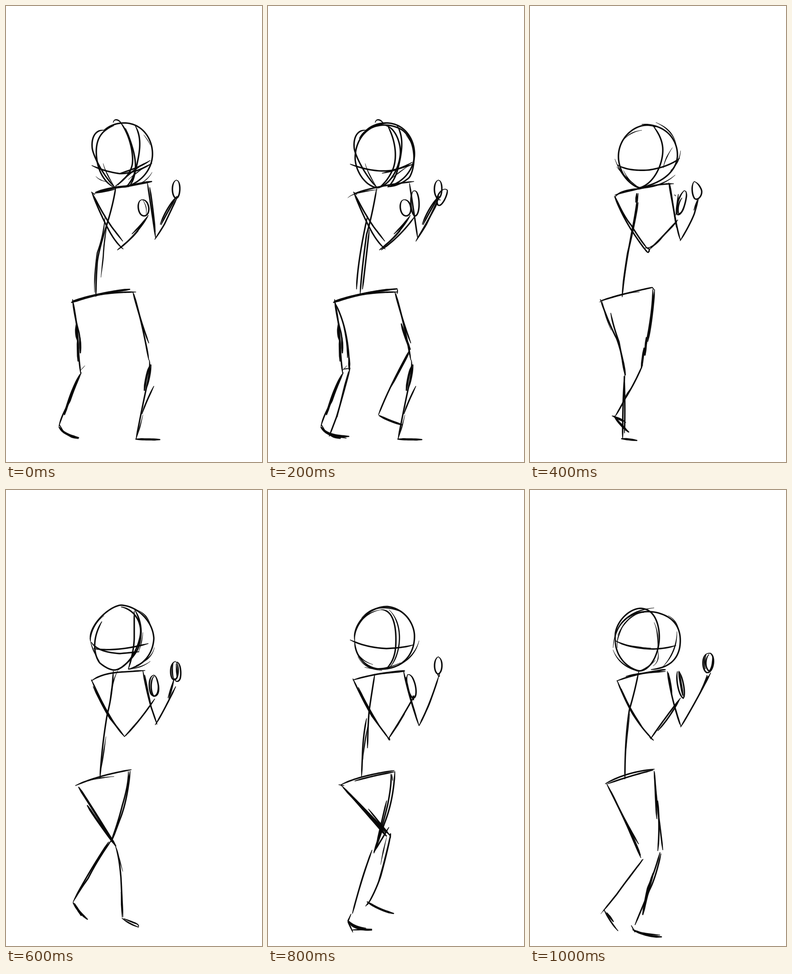
Recreate the animation shown at these times as an HTML page. Size 561x998 px, loop 1200 ms.

```html
<!DOCTYPE html>
<html lang="en">
<head>
<meta charset="utf-8">
<title>Sketched walk cycle</title>
<style>
  html, body { margin: 0; width: 100%; height: 100%; overflow: hidden; background: #fff; }
  /* six poses side by side, shown one at a time */
  svg { display: block; width: 3366px; height: 998px; animation: walk 1.2s steps(6, end) infinite; }
  path { fill: none; stroke: #080808; stroke-width: 2.6; stroke-linecap: round; stroke-linejoin: round; }
  path.inked { fill: #080808; stroke-width: .3; }
  @keyframes walk { to { transform: translateX(-100%); } }
</style>
</head>
<body>
<svg viewBox="0 0 3366 998">
  <defs>
    <!-- lines common to the first two poses -->
    <g id="stance">
      <path d="M235 255Q236 248 243 249Q250 251 253 258M214 272Q236 255 262 256C300 258 322 292 321 326C320 355 300 385 262 396M215 272C198 270 186 285 189 312C192 330 215 375 240 398"/>
      <path d="M187 407L195 413M190 411Q210 452 232 484L256 515M188 408Q205 452 225 490Q240 518 257 532M244 534Q280 508 310 462M276 499Q298 478 312 458M246 532Q268 516 290 492"/>
      <path d="M297 424C288 426 287 447 296 457C306 464 314 455 313 442C311 428 304 423 297 424M373 381C362 385 362 415 372 421C382 422 384 388 376 382L373 381"/>
      <path d="M326 511Q340 490 347 478L376 417M338 478Q352 440 375 416M340 479Q346 465 372 420M310 388Q318 440 328 508"/>
      <path d="M145 646Q205 626 285 626M160 641Q200 630 240 625M146 642Q150 680 160 715Q164 740 163 760M146 644Q157 700 158 740Q160 780 164 806"/>
      <path class="b" d="M143 649Q200 628 272 620M154 697Q152 720 158 735M157 728L158 778M162 725L163 760M150 833Q138 860 128 895"/>
      <path class="t" d="M163 798L173 787M300 895Q292 930 284 949"/>
      <path d="M165 802Q150 835 140 865Q122 895 116 920M162 806Q140 845 128 895M117 916L126 933L145 944L159 947"/>
      <path d="M278 626Q295 690 313 738M280 630Q300 700 312 770M306 735L313 775M318 785Q315 820 305 842M314 775Q317 790 310 825Q300 870 285 948M324 832Q305 870 298 893"/>
      <path class="b" d="M116 921Q125 938 160 945M317 785Q308 800 303 842M284 948L338 949"/>
    </g>
  </defs>

  <g>
    <use href="#stance"/>
    <path d="M236 262C200 275 195 305 199 335C202 360 215 385 235 396M250 254C268 275 280 318 277 345C274 365 260 380 240 394M283 262C300 290 292 325 285 355Q277 385 262 396M262 268C275 300 290 340 281 372Q277 388 268 396"/>
    <path d="M188 349Q215 362 250 367Q285 366 320 344M250 366Q290 355 316 338M302 345Q270 365 245 392"/>
    <path class="t" d="M213 345Q218 365 238 396M197 373Q205 382 222 385M302 282Q312 295 316 304M320 364Q310 382 292 389M308 350Q285 365 268 380M300 425Q310 440 307 455"/>
    <path class="b" d="M196 408Q230 397 262 395Q295 388 320 384"/>
    <path d="M194 410L240 401M315 397Q322 440 327 494M241 393Q236 430 222 475Q203 535 200 560Q197 600 197 636"/>
    <path class="t" d="M217 458Q215 500 200 540Q193 590 194 627M222 478Q215 510 213 550L208 594"/>
  </g>

  <g transform="translate(561)">
    <use href="#stance"/>
    <path d="M258 257C210 262 190 300 191 335C193 365 215 395 240 398C275 390 292 340 290 315C288 290 275 265 258 262M200 290C215 262 260 250 295 272C325 295 325 350 310 375Q290 393 262 396M262 262C278 290 287 335 270 365Q258 388 242 398M283 262C300 290 292 325 285 355Q277 385 262 396"/>
    <path d="M180 346Q230 365 270 360Q300 353 318 346M250 366Q290 358 316 342M190 410Q240 393 320 384M248 534Q290 505 322 460"/>
    <path class="t" d="M175 420Q185 408 240 402M213 345Q218 365 238 396M302 282Q312 295 316 304M308 350Q285 365 268 380"/>
    <path d="M318 405C310 415 312 455 322 460C333 458 334 420 325 406Q322 403 318 405M386 401C372 405 365 430 374 437C383 437 394 412 393 403Q390 400 386 401M368 420L378 425M324 515Q345 480 372 430"/>
    <path d="M238 400Q228 460 216 500Q205 580 202 630M218 460Q196 560 194 620M222 490Q213 570 207 620M145 647Q210 625 284 619L283 630"/>
    <path d="M147 650Q178 710 178 795M164 690Q176 740 174 770M180 792Q165 850 150 900L134 942M165 795L178 793M134 938L172 946"/>
    <path class="t" d="M176 800Q160 860 152 900M246 897L270 909"/>
    <path class="b" d="M116 922Q130 942 178 942M292 695Q300 725 312 752M243 896Q265 908 295 917M178 770L178 797"/>
    <path d="M311 752Q265 835 242 895M309 760L270 833"/>
  </g>

  <g transform="translate(1122)">
    <path d="M275 265C240 248 190 285 194 335C197 365 215 390 240 398C270 390 290 350 291 318C292 295 280 275 270 263M245 259C300 258 325 295 323 330C320 360 295 385 245 397M192 348Q215 362 260 359Q305 352 328 333"/>
    <path class="t" d="M276 255Q312 270 320 302M283 266Q308 275 320 305M205 293Q220 275 245 272M330 317Q327 345 308 360M326 335Q305 375 285 382M186 335Q205 385 240 400M190 352Q212 380 240 398M205 360Q215 382 232 393M312 310Q295 335 292 355M318 370Q290 395 240 400"/>
    <path d="M186 419Q195 403 240 400Q280 389 315 389M186 414Q200 408 240 400M185 416Q200 455 222 490Q245 525 258 540M187 418Q205 460 222 480Q240 510 258 532M246 525L258 540Q265 535 258 528L252 530"/>
    <path d="M258 530Q275 525 290 505L324 468M262 533Q290 505 322 472M338 404C328 412 318 440 322 456C330 462 340 440 343 415Q343 403 338 404M325 412L320 458M333 420Q322 435 325 455Q335 455 340 430M317 413L319 416"/>
    <path d="M304 387Q312 430 319 468Q325 500 330 513M306 388Q314 440 321 485M329 514Q350 480 360 455L369 423M359 447L367 424M360 384C353 390 354 415 362 423C372 424 378 412 376 403Q370 388 360 384"/>
    <path d="M237 410Q232 450 224 490Q205 590 202 637M237 430Q227 490 214 540Q206 590 203 620M155 645Q210 628 268 616L273 622"/>
    <path class="t" d="M152 648Q200 627 240 626M224 833Q210 850 205 863M158 645Q165 680 178 710"/>
    <path d="M154 642Q175 700 190 728Q205 770 208 808M177 672Q182 700 195 735L208 805M208 808Q203 850 203 948M206 810Q209 870 207 935"/>
    <path d="M269 620Q270 650 260 710L250 765M273 621Q268 690 258 735M247 785Q230 825 208 860Q195 885 186 899M180 897Q205 905 210 912M180 897L205 910"/>
    <path class="b" d="M234 410L232 430M202 770L209 808M200 947Q215 948 235 951M255 725L252 765M250 748L244 793M184 897Q200 920 217 933M188 904L215 932"/>
  </g>

  <g transform="translate(1683)">
    <path d="M185 330C180 300 220 258 250 252C285 252 322 285 324 325C322 360 300 385 268 392M210 288C188 325 192 360 205 378Q225 395 240 394C275 385 297 330 295 305C292 275 270 258 252 256M281 265L281 325Q280 355 268 392M282 262Q305 300 290 345Q280 370 245 394"/>
    <path d="M187 333Q200 355 250 358L292 354M192 347Q240 355 312 336"/>
    <path class="t" d="M184 325Q188 350 205 375M285 262Q310 270 318 300M325 345Q320 370 285 384M316 375Q300 388 268 393M300 312Q298 335 290 355M185 330Q187 295 215 275"/>
    <path d="M187 418Q210 400 260 398L305 395M187 415Q210 465 222 485Q240 518 260 540M191 430Q215 480 228 500L258 537M259 540Q290 510 326 457M262 538L295 500"/>
    <path d="M324 405C312 407 312 435 318 447C326 456 337 450 334 428Q330 406 324 405M325 407C317 412 315 440 324 452Q336 448 333 425"/>
    <path d="M300 396Q308 440 318 475L331 513M304 405Q312 450 318 472M327 514Q340 495 372 430M355 455L368 415M357 457Q365 430 368 412"/>
    <path d="M372 375C360 376 357 405 366 415C378 420 380 390 374 377M372 377C381 372 386 400 381 415Q372 425 370 412M366 380Q362 400 368 415M373 380L375 412"/>
    <path d="M235 396Q233 450 222 490Q210 560 206 630M152 647Q200 625 275 612M240 780Q248 800 252 850L256 935"/>
    <path class="t" d="M245 395Q232 420 228 460M219 540Q212 590 206 622M180 637Q200 630 237 627M242 785L256 835M252 880L254 935"/>
    <path class="b" d="M159 650Q185 690 205 722L241 780M178 690Q200 725 240 778M150 905L165 932M147 903Q160 925 179 940"/>
    <path d="M268 616Q270 640 255 690Q245 730 230 770M272 615Q266 680 250 720L232 768M232 765Q200 810 180 850Q155 885 147 902M225 770Q185 830 150 895M254 937Q270 950 291 957M258 938L288 950Q293 955 289 957"/>
  </g>

  <g transform="translate(2244)">
    <path d="M190 330C185 290 225 255 260 255C295 257 322 290 321 322C320 365 290 393 245 392C215 390 190 365 190 330M248 262C275 262 282 300 280 340Q278 375 258 392M180 328Q215 345 260 347Q300 345 318 339"/>
    <path class="t" d="M205 280Q235 245 290 265Q315 280 321 315M265 262C285 280 293 315 285 350Q278 380 262 392M192 345Q197 372 230 382M331 330Q322 365 285 385M197 365Q212 392 250 395M212 388Q250 398 290 378M190 320Q200 270 248 262"/>
    <path d="M186 416Q230 402 300 395M230 404Q270 399 300 397M186 413Q210 465 228 495L266 546M198 432Q215 470 248 523M262 542L267 549L266 541M264 544Q290 505 321 450"/>
    <path d="M306 404C300 415 307 448 318 456C328 455 326 425 315 408Q309 402 306 404M297 396Q308 450 331 516M302 410Q312 460 325 495M331 516Q355 470 374 408M371 402L375 410L376 402M373 365C363 369 362 397 372 403C383 402 385 370 373 365"/>
    <path class="t" d="M268 540L300 490M335 505Q355 470 362 445M220 510Q210 560 208 590M260 760Q250 800 247 820M224 800Q210 835 195 890"/>
    <path d="M234 403Q228 440 222 480Q219 510 218 565M216 500Q208 540 207 580L205 627M160 645Q200 625 277 614M190 637Q230 625 277 617M155 645L167 647"/>
    <path d="M160 646Q210 695 268 757M165 652Q200 690 258 750M220 698L268 757M269 622Q272 640 262 690Q250 740 232 792M278 616Q275 680 255 730Q245 760 232 795M271 622L273 636M260 680Q248 730 238 775M232 793L265 738"/>
    <path class="b" d="M185 672L260 758M318 450L319 460M268 752L268 762M217 901Q245 920 276 927M177 944Q185 962 228 963"/>
    <path d="M269 752Q262 790 247 845Q235 880 218 908M268 760Q250 835 240 865M214 911L222 900M228 788Q205 850 185 927M182 928L175 944L186 968M183 963L228 961M178 944Q190 957 215 959"/>
  </g>

  <g transform="translate(2805)">
    <path d="M188 330C180 300 210 262 240 259C280 258 285 310 283 330C280 365 262 395 240 396C210 390 185 360 187 325M195 300C215 265 260 260 290 272C325 285 333 315 328 345C322 375 300 390 265 393M187 330Q220 347 270 348Q300 347 320 340"/>
    <path class="t" d="M205 285Q230 262 272 258M192 318Q215 270 250 268M182 345Q187 290 225 272M192 345Q187 325 208 290M200 337Q235 345 265 346M272 290Q282 310 280 350M182 350Q195 385 240 398M322 310Q322 355 290 388M275 372Q265 385 240 396M303 275Q322 285 327 310M280 350Q285 375 270 385"/>
    <path d="M190 418Q230 402 297 393M210 408Q240 400 297 397M191 417Q208 460 225 490Q245 522 270 547M200 435Q215 475 248 522M262 541L271 548M264 545Q295 500 330 455M280 527Q305 500 328 458"/>
    <path d="M323 397C319 415 326 450 336 456C342 445 335 410 326 396M301 397Q310 460 331 518M303 400Q310 430 311 450M316 470L328 512M330 519Q360 470 396 400M370 450L390 407M372 445Q383 425 388 405"/>
    <path d="M388 358C376 362 376 395 388 400C402 400 408 365 395 357L388 358M392 360C383 370 383 390 393 397Q402 385 400 362M386 360Q380 375 384 392"/>
    <path d="M238 398Q230 440 218 480Q208 540 208 633M165 643Q210 617 273 611M170 643Q220 625 270 613M168 643Q195 695 215 740L243 805M178 660Q200 710 238 775"/>
    <path class="t" d="M219 490Q210 550 209 590M240 818L246 808M230 833L205 865M165 915L155 928"/>
    <path d="M272 615Q278 690 284 730L291 788M273 618Q276 700 278 720M280 680Q285 740 280 790M248 808Q215 850 190 885L160 922M162 918Q175 945 193 965"/>
    <path d="M285 793Q272 840 258 870Q252 895 247 930M287 796Q275 850 262 875L230 952M222 953L230 968M228 965Q250 972 285 974"/>
    <path class="b" d="M285 394L297 393M326 398L335 450M215 735L242 800M168 925L183 945M270 838Q255 890 247 930M225 962Q255 978 289 978"/>
  </g>
</svg>
<script>
  const brushes = {
    b: { width: 4.4, tip: .45, fade: 12 },
    t: { width: 2.3, tip: .15, fade: 30 },
    pen: { width: 2.9, tip: .4, fade: 14 }
  };
  const guide = document.createElementNS('http://www.w3.org/2000/svg', 'path');

  // Turns a centre line into a brush stroke with tapered ends.
  function ink(d, { width, tip, fade }) {
    guide.setAttribute('d', d);
    const len = guide.getTotalLength();
    const n = Math.max(5, Math.ceil(len / 4));
    const left = [], right = [];
    for (let i = 0; i <= n; i++) {
      const s = len * i / n;
      const p = guide.getPointAtLength(s);
      const a = guide.getPointAtLength(Math.max(0, s - .5));
      const b = guide.getPointAtLength(Math.min(len, s + .5));
      const span = Math.hypot(b.x - a.x, b.y - a.y) || 1;
      const press = Math.min(1, tip + (1 - tip) * Math.min(s, len - s) / fade);
      const k = width / 2 * press / span;
      const dx = (a.y - b.y) * k, dy = (b.x - a.x) * k;
      left.push(`${(p.x + dx).toFixed(2)} ${(p.y + dy).toFixed(2)}`);
      right.unshift(`${(p.x - dx).toFixed(2)} ${(p.y - dy).toFixed(2)}`);
    }
    return `M${left.concat(right).join('L')}Z`;
  }

  for (const path of document.querySelectorAll('path')) {
    const brush = brushes[path.getAttribute('class') || 'pen'];
    const lines = path.getAttribute('d').split('M').slice(1);
    path.setAttribute('d', lines.map(line => ink('M' + line, brush)).join(''));
    path.setAttribute('class', 'inked');
  }
</script>
</body>
</html>
```
